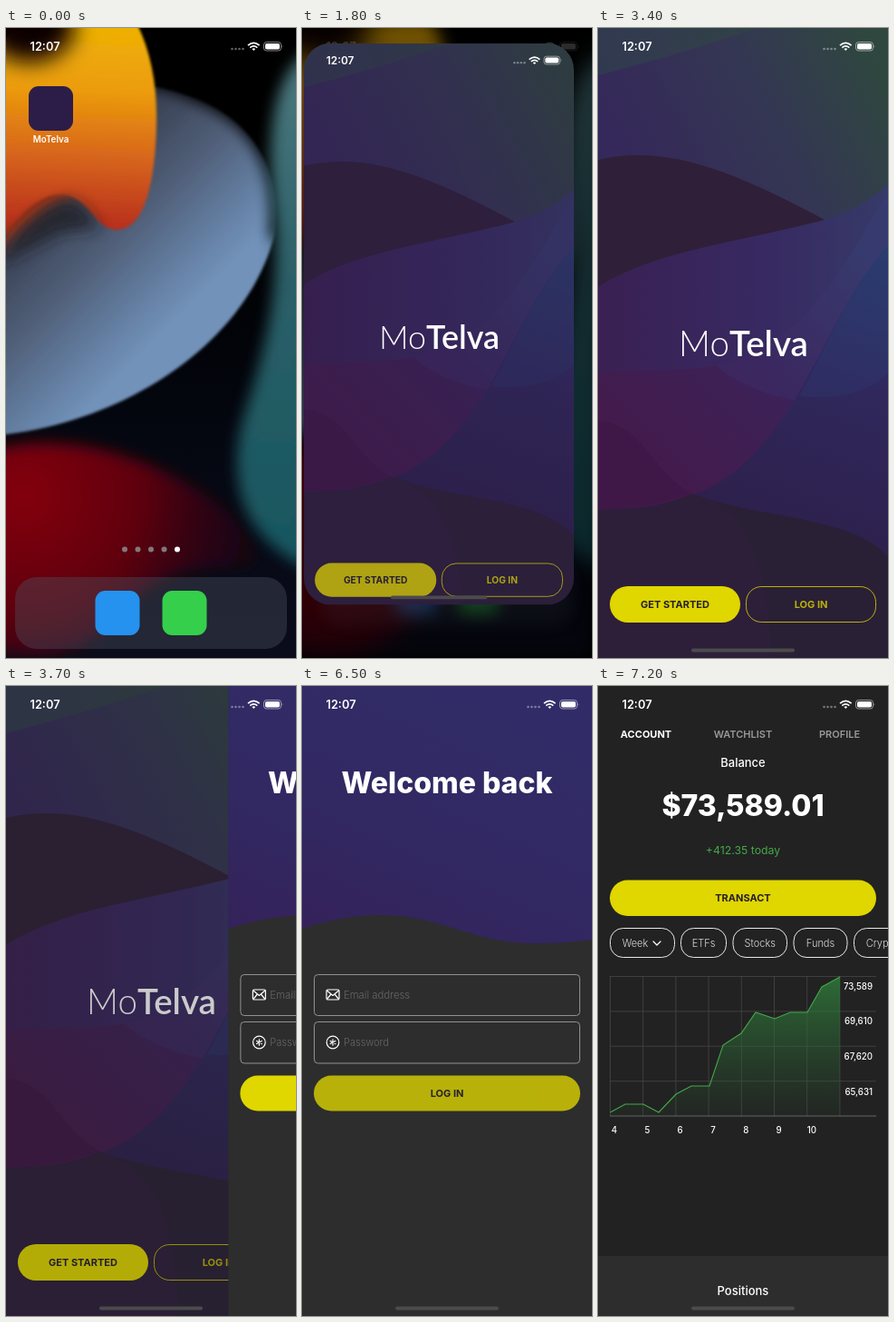
An HTML page for the animation above (8 s loop, 320 by 693 pixels).

```html
<!DOCTYPE html>
<html lang="en">
<head>
<meta charset="utf-8">
<title>Trading app sign-in</title>
<style>
  html, body { margin: 0; width: 100%; height: 100%; overflow: hidden; background: #000; }
  svg { display: block; width: 100vw; height: 100vh; }
  text { font: 400 11px Inter, sans-serif; fill: #fff; }
  .mid text, .mid { text-anchor: middle; }
  .end text { text-anchor: end; }
  .btn { font-weight: 700; fill: #251f2b; }
  .tab { font-weight: 600; fill: #999; }
  .big { font-weight: 800; font-size: 32px; }
  .sub { font-weight: 500; font-size: 13px; }
  .hint { font-weight: 300; fill: #666; }
  .chip { font-weight: 300; fill: #ddd; }
  .axis text { font-weight: 500; font-size: 9.7px; }
  .mark { font: 600 38.5px Lato, sans-serif; }
  .thin { font-weight: 300; }
  .line { fill: none; stroke: #fff; stroke-width: 1.2; stroke-linecap: round; stroke-linejoin: round; }
</style>
</head>
<body>
<svg viewBox="0 0 320 693" preserveAspectRatio="none" xmlns="http://www.w3.org/2000/svg">
  <defs>
    <filter id="b2" x="-20%" y="-20%" width="140%" height="140%"><feGaussianBlur stdDeviation="1.8"/></filter>
    <filter id="b8" x="-50%" y="-50%" width="200%" height="200%"><feGaussianBlur stdDeviation="8"/></filter>
    <filter id="b12" x="-80%" y="-80%" width="260%" height="260%"><feGaussianBlur stdDeviation="12"/></filter>

    <linearGradient id="night" x2="0" y2="1">
      <stop offset=".3" stop-color="#000"/><stop offset=".62" stop-color="#04060f"/><stop offset="1" stop-color="#0a0c1c"/>
    </linearGradient>
    <linearGradient id="steel" gradientUnits="userSpaceOnUse" x1="40" y1="110" x2="220" y2="290">
      <stop offset="0" stop-color="#262b38"/><stop offset=".3" stop-color="#3c4558"/><stop offset=".55" stop-color="#4f5d76"/>
      <stop offset=".8" stop-color="#617b9d"/><stop offset="1" stop-color="#7292ba"/>
    </linearGradient>
    <linearGradient id="flame" gradientUnits="userSpaceOnUse" x1="95" y1="0" x2="85" y2="225">
      <stop offset="0" stop-color="#eeb005"/><stop offset=".3" stop-color="#eb9c0a"/>
      <stop offset=".6" stop-color="#d9691a"/><stop offset="1" stop-color="#b52a1c"/>
    </linearGradient>
    <linearGradient id="teal" x2="0" y2="1">
      <stop offset="0" stop-color="#4d7a80"/><stop offset=".45" stop-color="#2b5f68"/><stop offset="1" stop-color="#16565f"/>
    </linearGradient>
    <radialGradient id="red" gradientUnits="userSpaceOnUse" cx="20" cy="515" r="260">
      <stop offset="0" stop-color="#84000a"/><stop offset=".5" stop-color="#5e060c"/><stop offset="1" stop-color="#2a080e" stop-opacity=".4"/>
    </radialGradient>

    <linearGradient id="dusk" x1="0" y1="1" x2="1" y2="0">
      <stop offset="0" stop-color="#2c3054"/><stop offset=".6" stop-color="#323c4e"/><stop offset="1" stop-color="#2d4a38"/>
    </linearGradient>
    <linearGradient id="slope" gradientUnits="userSpaceOnUse" x1="40" y1="160" x2="300" y2="20">
      <stop offset="0" stop-color="#35285a"/><stop offset=".55" stop-color="#343753"/><stop offset="1" stop-color="#2f473f"/>
    </linearGradient>
    <linearGradient id="band" x1="0" x2="1">
      <stop offset="0" stop-color="#3a2053"/><stop offset=".6" stop-color="#372a62"/><stop offset="1" stop-color="#363a68"/>
    </linearGradient>
    <linearGradient id="plum" gradientUnits="userSpaceOnUse" x1="60" y1="480" x2="290" y2="250">
      <stop offset="0" stop-color="#431b4c"/><stop offset=".5" stop-color="#3c2258"/><stop offset="1" stop-color="#363a6a"/>
    </linearGradient>
    <linearGradient id="deep" gradientUnits="userSpaceOnUse" x1="320" y1="240" x2="200" y2="560">
      <stop offset="0" stop-color="#2b3a6a"/><stop offset=".45" stop-color="#30285c"/><stop offset="1" stop-color="#2d204c"/>
    </linearGradient>
    <linearGradient id="head" x1="0" y1="1" x2=".5" y2="0">
      <stop offset="0" stop-color="#352159"/><stop offset=".45" stop-color="#322862"/><stop offset="1" stop-color="#312c67"/>
    </linearGradient>
    <linearGradient id="area" gradientUnits="userSpaceOnUse" x1="0" y1="319" x2="0" y2="473">
      <stop offset="0" stop-color="#2f7a3a" stop-opacity=".85"/><stop offset="1" stop-color="#2a5a32" stop-opacity=".08"/>
    </linearGradient>
    <clipPath id="clip"><rect id="frame"/></clipPath>

    <g id="status">
      <text x="43" y="25" class="mid" style="font-weight:600;font-size:12.8px">12:07</text>
      <g fill="#fff" fill-opacity=".38">
        <circle cx="249.5" cy="23" r="1.3"/><circle cx="253.5" cy="23" r="1.3"/><circle cx="257.5" cy="23" r="1.3"/><circle cx="261.5" cy="23" r="1.3"/>
      </g>
      <g fill="none" stroke="#fff" stroke-width="1.8">
        <path d="M267 19.2Q273.3 13.6 279.6 19.2M269.3 21.6Q273.3 18.2 277.3 21.6"/>
        <path d="M273.3 24.9L271.4 23Q273.3 21.6 275.2 23Z" fill="#fff" stroke="none"/>
      </g>
      <rect x="284.5" y="15.5" width="19" height="9.5" rx="3" fill="none" stroke="#fff" stroke-opacity=".5"/>
      <rect x="286" y="17" width="16" height="6.5" rx="1.8" fill="#fff"/>
      <path d="M304.7 18.5q1.5 1.7 0 3.5z" fill="#fff" fill-opacity=".5"/>
    </g>
  </defs>

  <rect width="320" height="693" fill="#000"/>
  <g id="home">
    <g id="wallpaper">
      <rect width="320" height="693" fill="url(#night)"/>
      <path d="M-20 70C60 50 150 52 215 80C280 108 304 165 297 225C268 345 130 438 -20 449Z" fill="url(#steel)" filter="url(#b2)"/>
      <path d="M120 54C160 50 190 62 220 76C285 104 310 165 299 232" fill="none" stroke="#000" stroke-width="18" filter="url(#b8)"/>
      <path d="M-30 470C40 440 140 462 215 510C260 540 285 575 270 592C210 590 165 600 130 640C90 690 40 700 -30 680Z" fill="url(#red)" filter="url(#b8)"/>
      <path d="M335 25C292 50 286 130 297 210C302 300 284 360 262 430C245 490 255 560 335 595Z" fill="url(#teal)" filter="url(#b8)"/>
      <path d="M-20 20H90V190C60 170 25 225 -20 250Z" fill="#a23417" filter="url(#b8)"/>
      <path d="M20 -10H142C160 25 167 62 166 105C165 160 156 222 122 222C98 222 88 183 62 183C30 184 20 205 -10 228V20Z" fill="url(#flame)" filter="url(#b2)"/>
      <ellipse cx="26" cy="-2" rx="50" ry="40" fill="#0a0600" filter="url(#b12)"/>
      <path d="M-10 262C15 215 40 198 62 190C82 184 92 205 105 220L60 225Z" fill="#1d1a22" opacity=".75" filter="url(#b8)"/>
    </g>
    <use id="ghost" href="#status"/>
    <g id="icons">
      <g id="app-icon">
        <rect x="25" y="64" width="49" height="49" rx="11" fill="#2c1d48"/>
        <rect id="press" x="25" y="64" width="49" height="49" rx="11" fill="#000" opacity="0"/>
      </g>
      <text x="49.5" y="126" class="mid" style="font-weight:600;font-size:9.8px">MoTelva</text>
      <g fill="#82777a">
        <circle cx="131" cy="573.5" r="3"/><circle cx="145.5" cy="573.5" r="3"/><circle cx="160" cy="573.5" r="3"/>
        <circle cx="174.5" cy="573.5" r="3"/><circle cx="189" cy="573.5" r="3" fill="#fff"/>
      </g>
      <rect x="10" y="604" width="300" height="79" rx="24" fill="#4b5060" fill-opacity=".4"/>
      <rect x="98.5" y="619" width="49" height="49" rx="11" fill="#2492ee"/>
      <rect x="172.5" y="619" width="49" height="49" rx="11" fill="#35cf4b"/>
    </g>
  </g>

  <g id="app" clip-path="url(#clip)">
    <g id="content">
      <g id="splash">
        <rect width="320" height="693" fill="url(#dusk)"/>
        <path d="M0 52C55 38 110 22 175 0H320V230H0Z" fill="url(#slope)"/>
        <path d="M0 145C75 128 145 155 250 211L150 260L0 300Z" fill="#2f1f38"/>
        <path d="M0 285C60 245 160 235 250 211C280 202 300 190 320 172V400H0Z" fill="url(#band)"/>
        <path d="M320 178V693H0V378C60 378 105 376 130 371C230 350 275 255 320 178Z" fill="url(#plum)"/>
        <path d="M130 371C165 405 280 440 320 375V178C275 255 230 350 130 371Z" fill="#3a3a78" opacity=".25"/>
        <path d="M320 240C255 310 235 410 165 475C120 520 60 530 0 530V693H320Z" fill="url(#deep)"/>
        <path d="M320 240C275 290 255 345 222 405C265 410 300 400 320 380Z" fill="#2c4580" opacity=".22"/>
        <path d="M0 432C50 435 60 490 104 512C60 527 30 530 0 530Z" fill="#3c1745" opacity=".5"/>
        <path d="M0 530C40 530 75 525 104 512C170 540 280 535 320 582V693H0Z" fill="#2d1f3a"/>
        <path d="M104 512C160 530 185 570 192 693H320V582C280 535 170 540 104 512Z" fill="#2a2035"/>
        <rect x="13" y="614" width="144" height="40" rx="20" fill="#e0d600"/>
        <text x="85" y="638" class="mid btn">GET STARTED</text>
        <g id="login-link">
          <rect x="163.5" y="614.5" width="143" height="39" rx="17" fill="none" stroke="#e0d600"/>
          <text x="235" y="638" class="mid btn" style="fill:#e0d600">LOG IN</text>
        </g>
      </g>
      <rect id="veil" width="320" height="693" fill="#2c1d48"/>
      <text id="mark" x="160.5" y="361" class="mid mark"><tspan class="thin">Mo</tspan>Telva</text>
      <rect id="dim" width="320" height="693" fill="#222"/>

      <g id="login">
        <rect width="320" height="693" fill="#2d2d2d"/>
        <path d="M0 0H320V279C300 282 280 283 255 283C190 283 150 252 90 252C60 252 30 257 0 267Z" fill="url(#head)"/>
        <text x="160" y="118" class="mid big">Welcome back</text>
        <g fill="none" stroke="#919191">
          <rect x="13.5" y="317.5" width="293" height="45" rx="4"/>
          <rect x="13.5" y="369.5" width="293" height="45.5" rx="4"/>
        </g>
        <g class="line">
          <rect x="27" y="334" width="14" height="11" rx="1.5"/>
          <path d="M27.5 335L34 340.5L40.5 335M27.5 344.5L32 339M40.5 344.5L36 339"/>
          <circle cx="34" cy="392" r="6.8"/>
          <path d="M34 388.8V395.2M31.2 390.4L36.8 393.6M31.2 393.6L36.8 390.4"/>
        </g>
        <text x="46" y="344" class="hint" style="font-size:11.3px">Email address</text>
        <text x="46" y="396" class="hint">Password</text>
        <g id="login-btn">
          <rect x="13" y="428.5" width="294" height="39" rx="19.5" fill="#e0d600"/>
          <text x="160" y="452" class="mid btn">LOG IN</text>
        </g>
      </g>

      <g id="account">
        <rect width="320" height="693" fill="#222"/>
        <g class="mid">
          <text x="53" y="56.5" class="tab" style="fill:#fff;font-weight:700">ACCOUNT</text>
          <text x="160" y="56.5" class="tab">WATCHLIST</text>
          <text x="266.5" y="56.5" class="tab">PROFILE</text>
          <text x="160" y="89" class="sub">Balance</text>
          <text x="160" y="143" class="big">$73,589.01</text>
          <text x="160" y="184.5" style="font-size:12.3px;fill:#43a849">+412.35 today</text>
          <rect x="13" y="213.5" width="294" height="39.5" rx="19.7" fill="#e0d600"/>
          <text x="160" y="237" class="btn">TRANSACT</text>
        </g>
        <g id="chips" class="mid"></g>
        <path d="M61 281L65 285L69 281" class="line"/>
        <path id="grid" fill="none" stroke="#474747" stroke-width=".8"/>
        <path d="M13 473H307" stroke="#777" stroke-width=".8"/>
        <path id="fill" fill="url(#area)"/>
        <path id="curve" fill="none" stroke="#43a849" stroke-width="1.1"/>
        <g id="values" class="axis end"></g>
        <g id="days" class="axis mid"></g>
        <rect y="627" width="320" height="66" fill="#2d2d2d"/>
        <text x="160" y="670" class="mid sub">Positions</text>
      </g>
      <use id="bar" href="#status"/>
      <rect id="grip" x="103" y="682.5" width="114" height="4" rx="2" fill="#4b4a4c"/>
    </g>
  </g>
</svg>
<script>
const $ = id => document.getElementById(id);
const set = (id, attrs) => { for (const k in attrs) $(id).setAttribute(k, attrs[k]); };
const lerp = (a, b, p) => a + (b - a) * p;
const clamp = v => Math.min(1, Math.max(0, v));
const LOOP = 8000, STEP = 100;

function label(x, y, s, cls = '') {
  return `<text x="${x}" y="${y}" class="${cls}">${s}</text>`;
}

function buildAccount() {
  const chips = [['Week', 13, 72, 41], ['ETFs', 91, 51], ['Stocks', 148.5, 60.5], ['Funds', 215.5, 60], ['Crypto', 282, 62]];
  $('chips').innerHTML = chips.map(([s, x, w, tx = x + w / 2]) =>
    `<rect x="${x + .5}" y="266.5" width="${w - 1}" height="32" rx="14" fill="none" stroke="#e8e8e8"/>` +
    label(tx, 286.5, s, 'chip')).join('');

  let d = '';
  for (let i = 0; i < 8; i++) d += `M${13.5 + i * 36.2} 319V473`;
  for (let i = 0; i < 4; i++) d += `M13 ${319.5 + i * 38.4}H307`;
  set('grid', { d });

  const pts = '13.5 469 30 460 50 460 67 469 86 449 103 440 123 440 138 395 158 382 174 359 195 366 212 359 231 359 247 331 267 320';
  set('curve', { d: 'M' + pts });
  set('fill', { d: `M${pts}V473H13.5Z` });

  $('values').innerHTML = ['73,589', '69,610', '67,620', '65,631']
    .map((s, i) => label(303, 333.5 + i * 38.7, s)).join('');
  $('days').innerHTML = [4, 5, 6, 7, 8, 9, 10]
    .map((s, i) => label(18 + i * 36.3, 492, s)).join('');
}

// critically damped spring for the window opening
function opening(t) {
  if (t < 1600) return 0;
  if (t >= 2300) return 1;
  const u = (t - 1550) * .0166;
  return 1 - (1 + u) * Math.exp(-u);
}

function slide(t, start) {
  const u = clamp((t - start) / 437);
  return u * u * (3 - 2 * u);
}

function push(id, p) {
  set(id, { transform: `translate(${320 * (1 - p)} 0)`, display: p > 0 ? 'inline' : 'none' });
}

function drawWindow(p) {
  const w = lerp(49, 320, p), h = lerp(49, 693, p ** 1.47);
  const x = lerp(49.5, 160, p) - w / 2, y = lerp(88.5, 346.5, p) - h / 2;
  const scale = w / 320, rx = Math.min(30 * clamp((1 - p) * 12), w * .22);
  const front = clamp(2 * p - .8);
  set('app', { display: p > 0 ? 'inline' : 'none' });
  set('frame', { x, y, width: w, height: h, rx });
  set('content', { transform: `translate(${x} ${y}) scale(${scale})` });
  set('grip', { transform: `translate(0 ${h / scale - 693})` });
  set('veil', { opacity: clamp((1 - p) * 3.4) });
  set('mark', { opacity: front });
  set('bar', { opacity: front });
}

function drawHome(t, p) {
  const s = 1 - .08 * p, blur = `blur(${10 * p}px)`;
  set('home', { display: p < 1 ? 'inline' : 'none' });
  $('wallpaper').style.filter = p > 0 ? `${blur} brightness(${1 - .58 * p})` : 'none';
  $('icons').style.filter = p > 0 ? blur : 'none';
  set('icons', {
    opacity: 1 - .75 * p,
    transform: `translate(160 346.5) scale(${s}) translate(-160 -346.5)`
  });
  set('ghost', { opacity: 1 - .9 * p });
  set('press', { opacity: t >= 1400 ? .4 : 0 });
  set('app-icon', { opacity: p > 0 ? 0 : 1 });
}

function draw(t) {
  const p = opening(t), toLogin = slide(t, 3563), toAccount = slide(t, 6763);
  drawHome(t, p);
  drawWindow(p);
  set('login-link', { opacity: t >= 3400 ? .8 : 1 });
  set('dim', { opacity: toLogin });
  set('login-btn', { opacity: t >= 6500 ? .78 : 1 });
  push('login', toLogin);
  push('account', toAccount);
}

buildAccount();
let start;
function tick(now) {
  start ??= now;
  const t = (now - start) % LOOP;
  draw(Math.floor(t / STEP) * STEP);
  requestAnimationFrame(tick);
}
draw(0);
requestAnimationFrame(tick);
</script>
</body>
</html>
```
